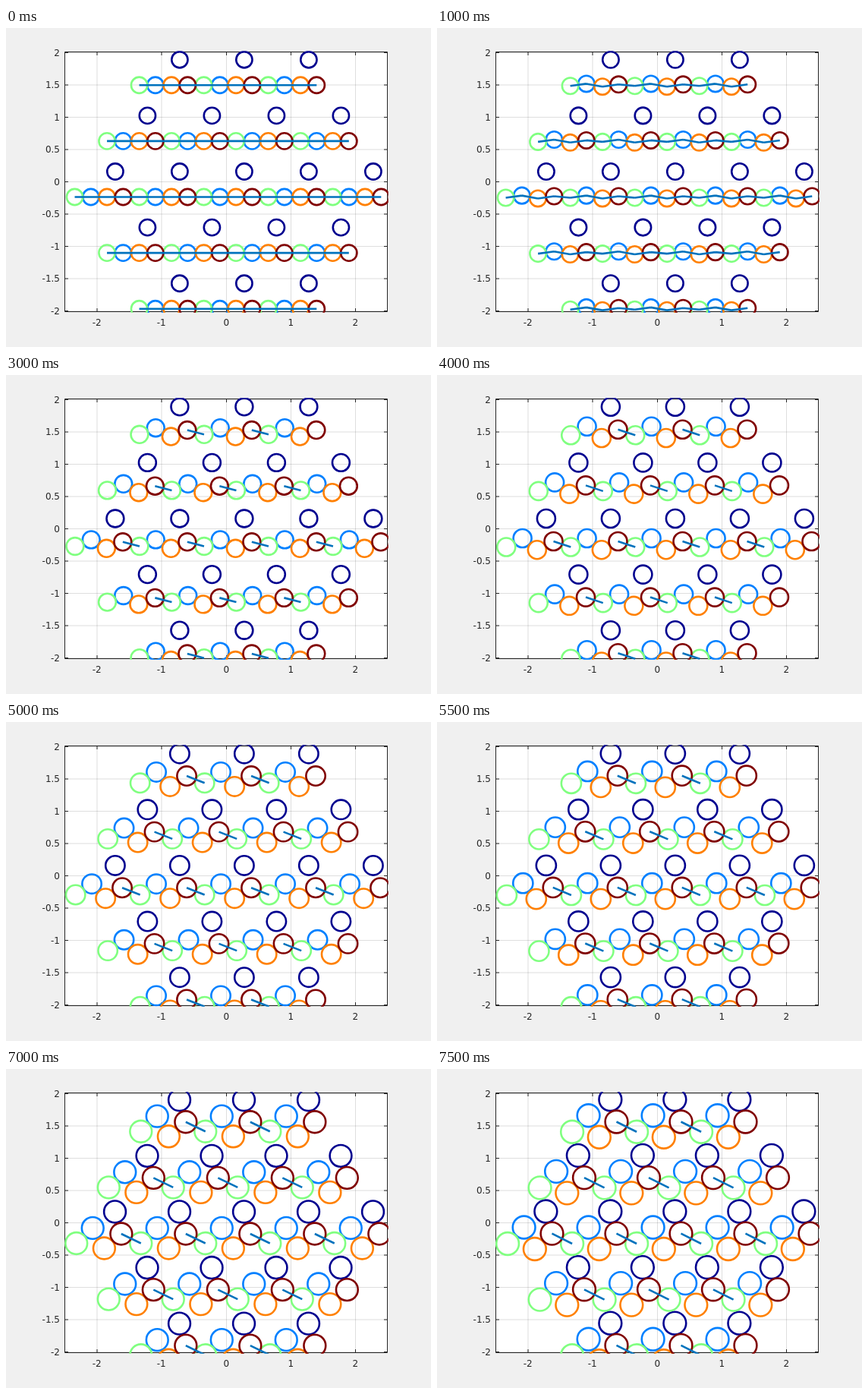
An HTML page for the animation above (8 s loop, 560 px wide and 420 px high).

```html
<!DOCTYPE html>
<html>
<head>
<meta charset="utf-8">
<style>
  html, body { margin: 0; width: 100%; height: 100%; overflow: hidden; background: #f0f0f0; }
  svg { display: block; }
  text { font: 12px "DejaVu Sans", sans-serif; fill: #262626; }
</style>
</head>
<body>
<svg id="stage" width="560" height="420" viewBox="0 0 560 420">
  <defs><clipPath id="plot"><rect x="77" y="30.3" width="426.7" height="344.4"/></clipPath></defs>
  <rect x="77.5" y="31.5" width="425" height="342" fill="#fff"/>
  <path id="grid" stroke="#262626" stroke-opacity=".15" fill="none"/>
  <path id="axes" stroke="#262626" fill="none"/>
  <g id="labels"></g>
  <g id="discs" clip-path="url(#plot)" fill="none" stroke-width="2.6"></g>
</svg>
<script>
const NS = "http://www.w3.org/2000/svg";
const UNIT = 85, ROW = UNIT * Math.sqrt(3) / 2;
const BOX = { left: 77.5, right: 502.5, top: 31.5, bottom: 373.5 };
const LOOP = 8000, STEP = 500;
const $ = id => document.getElementById(id);

function add(parent, tag, attrs, text) {
  const el = document.createElementNS(NS, tag);
  for (const k in attrs) el.setAttribute(k, attrs[k]);
  if (text !== undefined) el.textContent = text;
  parent.appendChild(el);
  return el;
}

function drawAxes() {
  const { left, right, top, bottom } = BOX;
  let grid = "", axes = `M${left} ${top}H${right}V${bottom}H${left}Z`;
  for (let v = -2; v <= 2; v++) {
    const x = 290.5 + v * UNIT - (v < 0 ? 0.5 : 0);
    grid += `M${x} ${top}V${bottom}`;
    axes += `M${x} ${bottom}v-4.5M${x} ${top}v4.5`;
    add($("labels"), "text", { x: x - 0.3, y: 391.5, "text-anchor": "middle" }, v);
  }
  for (let v = -2; v <= 2; v += 0.5) {
    const y = 202.5 - v * UNIT;
    grid += `M${left} ${y}H${right}`;
    axes += `M${left} ${y}h4.5M${right} ${y}h-4.5`;
    add($("labels"), "text", { x: 71, y: y + 4.3, "text-anchor": "end" }, v);
  }
  $("grid").setAttribute("d", grid);
  $("axes").setAttribute("d", axes);
}

// Lattice cells: rows of 3, 4, 5, 4, 3.
const cells = [];
for (let row = -2; row <= 2; row++) {
  const count = 5 - Math.abs(row);
  for (let i = 0; i < count; i++)
    cells.push({ x: 120.3 + UNIT * (i + Math.abs(row) / 2), y: 202.2 + row * ROW, last: i === count - 1 });
}

// Disc centres relative to their cell, t in seconds.
const late = t => Math.max(0, t - 4.5) ** 2;
const kinds = {
  navy:   { color: "#00008f", at: t => [23.6 - 0.06 * late(t), -13.2 - 0.17 * late(t)] },
  blue:   { color: "#0080ff", at: t => [-8.5 + 0.05 * t * t, 20.3 - 1.87 * t] },
  green:  { color: "#80ff80", at: t => [-29.75 + 0.045 * t * t, 20.3 + t] },
  orange: { color: "#ff8000", at: t => [12.75 - 0.075 * t * t, 20.3 + 1.93 * t] },
  red:    { color: "#800000", at: t => [34 - 0.05 * t * t, 20.3 - t + 0.03 * t * t] }
};

drawAxes();
for (const kind of Object.values(kinds))
  kind.discs = cells.map(() => add($("discs"), "circle", { stroke: kind.color }));
const bonds = add($("discs"), "path", { stroke: "#0072bd" });

function render(ms) {
  const t = Math.floor(ms / STEP) * STEP / 1000;
  const pos = {};
  for (const name in kinds) pos[name] = kinds[name].at(t);

  const { green, blue, orange, red } = pos;
  const nextGreen = [green[0] + UNIT, green[1]];
  const radius = Math.hypot(nextGreen[0] - red[0], nextGreen[1] - red[1]) / 2;

  let d = "";
  cells.forEach((cell, i) => {
    for (const name in kinds) {
      const disc = kinds[name].discs[i];
      disc.setAttribute("cx", cell.x + pos[name][0]);
      disc.setAttribute("cy", cell.y + pos[name][1]);
      disc.setAttribute("r", radius);
    }
    const bond = (a, b) => {
      d += `M${cell.x + a[0]} ${cell.y + a[1]}L${cell.x + b[0]} ${cell.y + b[1]}`;
    };
    if (t <= 2) { bond(green, blue); bond(orange, red); }
    if (t <= 1) bond(blue, orange);
    if (!cell.last) bond(red, nextGreen);
  });
  bonds.setAttribute("d", d);
}

const start = performance.now();
function tick() {
  render((performance.now() - start) % LOOP);
  requestAnimationFrame(tick);
}
tick();
</script>
</body>
</html>
```
